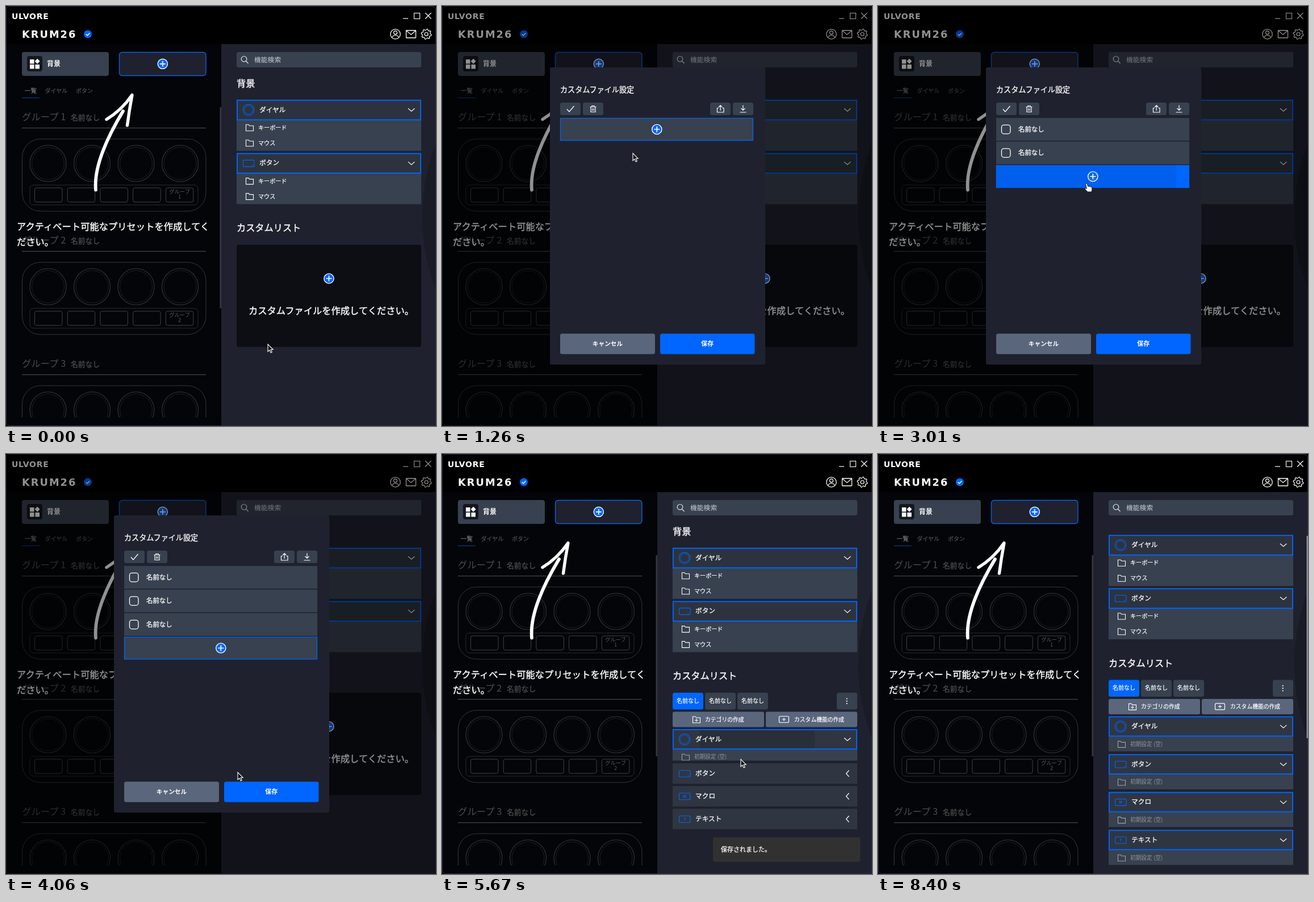
An HTML page for the animation above (8.54 s loop, 757 by 739 pixels).

```html
<!DOCTYPE html>
<html lang="ja">
<head>
<meta charset="utf-8">
<style>
html, body { margin: 0; width: 100%; height: 100%; overflow: hidden; background: #000; }
svg { display: block; }
text { font-family: "Noto Sans CJK JP", "Noto Sans CJK", "Noto Sans", sans-serif; white-space: pre; }
.brand { font-family: "DejaVu Sans", sans-serif; font-weight: 700; }
</style>
</head>
<body>
<svg id="stage" width="757" height="739" viewBox="0 0 757 739"></svg>
<script>
const LOOP = 8540, STEP = 70;
const BLUE = '#0066ff', PANEL = '#1f222e', SLATE = '#38414f', ROW = '#2f3642', STEEL = '#5a667c';

// --- markup helpers ---
const rect = (x, y, w, h, r, fill, stroke = 'none', sw = 1, extra = '') =>
  `<rect x="${x}" y="${y}" width="${w}" height="${h}" rx="${r}" fill="${fill}" stroke="${stroke}" stroke-width="${sw}" ${extra}/>`;
const circle = (x, y, r, fill, stroke = 'none', sw = 1, extra = '') =>
  `<circle cx="${x}" cy="${y}" r="${r}" fill="${fill}" stroke="${stroke}" stroke-width="${sw}" ${extra}/>`;
const line = (d, stroke = '#fff', sw = 1.2, extra = '') =>
  `<path d="${d}" fill="none" stroke="${stroke}" stroke-width="${sw}" ${extra}/>`;
// A hairline outline turns the regular face into a medium one.
const label = (x, cy, s, size, fill = '#fff', weight = 500, anchor = 'start') =>
  `<text x="${x}" y="${cy + size * 0.36}" font-size="${size}" fill="${fill}" font-weight="${weight}" text-anchor="${anchor}"` +
  (weight === 500 ? ` stroke="${fill}" stroke-width="${size * 0.024}"` : '') + `>${s}</text>`;
const group = (id, body, extra = '') => `<g id="${id}" ${extra}>${body}</g>`;
const crop = (x, y, w, h, body) =>
  `<svg x="${x}" y="${y}" width="${w}" height="${h}" viewBox="${x} ${y} ${w} ${h}">${body}</svg>`;
const times = (n, f) => Array.from({ length: n }, (_, i) => f(i)).join('');

// --- icons ---
const plus = (x, y) => circle(x, y, 8.6, BLUE, '#fff', 1.4) + line(`M${x - 5} ${y}h10M${x} ${y - 5}v10`, '#fff', 1.7);
const folder = (x, y, c = '#fff') => line(`M${x} ${y - 5.5}h4.5l1.8 2h6.7v9h-13z`, c, 1.1);
const chevDown = y => line(`M708 ${y - 2.5}l5.7 5 5.7 -5`);
const chevLeft = y => line(`M716.5 ${y - 5.5}l-5 5.5 5 5.5`);
const dialIcon = y => circle(427, y, 9.7, 'none', BLUE, 1.1) + circle(427, y, 7.4, 'none', BLUE, 0.7);
const keyIcon = (y, s = '') => rect(417.5, y - 5.5, 19.5, 11.5, 2, 'none', BLUE, 1.1) +
  (s ? label(427.2, y + .3, s, 6.5, BLUE, 700, 'middle') : line(`M432.5 ${y + 3.5}h2`, BLUE, 1));

function gear(x, y) {
  const at = i => {
    const a = (i + .5) * Math.PI / 16, r = i % 4 < 2 ? 9 : 7;
    return `${(x + r * Math.cos(a)).toFixed(1)} ${(y + r * Math.sin(a)).toFixed(1)}`;
  };
  return line(`M${Array.from({ length: 32 }, (_, i) => at(i)).join('L')}Z`, '#fff', 1.2, 'stroke-linejoin="round"') +
    circle(x, y, 3, 'none', '#fff', 1.2);
}

function header() {
  return rect(0, 0, 757, 67, 0, '#000') +
    '<text class="brand" x="10" y="22.5" font-size="14" letter-spacing=".7" fill="#fff">ULVORE</text>' +
    '<text class="brand" x="28" y="56" font-size="17.8" letter-spacing="2" fill="#fff">KRUM26</text>' +
    circle(144, 49.5, 7, BLUE) + line('M140.8 49.6l2.4 2.4 4.2-4.6', '#fff', 1.5) +
    line('M699 22h9') + rect(718.5, 12.5, 10, 10, 0, 'none', '#fff', 1.1) + line('M738 12l10.500 10.500M748.500 12l-10.500 10.500') +
    circle(685.5, 49.5, 8.7, 'none', '#fff', 1.3) + circle(685.5, 46.8, 3, 'none', '#fff', 1.2) + line('M679.500 55.500q1.500-4 6-4t6 4') +
    rect(704.5, 43, 17, 13, .5, 'none', '#fff', 1.3) + line('M705 43.500l8 7 8-7') +
    gear(740, 49.5);
}

function device(i) {
  const y = 217 * i, dim = '#373738';
  return label(28, 195.5 + y, `グループ ${i + 1}`, 16.4, '#4c4c4e', 400) +
    label(114, 196 + y, '名前なし', 12.8, '#4c4c4e') +
    line(`M28 ${214.7 + y}h324`, '#444446') +
    rect(28.5, 234 + y, 323.5, 127, 32, 'none', dim) +
    times(4, k => circle(74 + 77.5 * k, 277 + y, 32, 'none', dim, 1.1) + circle(74 + 77.5 * k, 277 + y, 28.5, 'none', '#232325', .9)) +
    rect(42, 315 + y, 296, 35, 6, 'none', '#2a2a2c') +
    times(5, k => rect(50.5 + 57.7 * k, 320 + y, 48.5, 25, 3.5, 'none', '#424244')) +
    label(305.5, 327 + y, 'グループ', 9.3, '#59595b', 400, 'middle') +
    label(305.5, 336 + y, i + 1, 9.3, '#59595b', 400, 'middle');
}

function leftPane() {
  const icon = rect(37, 88, 27, 27, 4, '#14171d') + rect(42, 94, 7.5, 7.5, .5, '#fff') + rect(42, 103, 7.5, 7.5, .5, '#fff') +
    rect(51.5, 103, 7.5, 7.5, .5, '#fff') + rect(52, 94, 6.5, 6.5, .5, '#fff', 'none', 0, 'transform="rotate(45 55.2 97.2)"');
  return rect(0, 67, 379, 672, 0, '#040508') +
    rect(28, 81, 153, 42, 4, SLATE) + icon + label(72, 102, '背景', 12, '#fff', 700) +
    rect(199.5, 81.5, 152.5, 41, 5, PANEL, '#0c5fe6', 1.4) + plus(275.8, 101.8) +
    label(33, 149.7, '一覧', 10.5, '#666') + label(68.5, 149.7, 'ダイヤル', 10, '#4f4f51') + label(123, 149.7, 'ボタン', 10, '#4f4f51') +
    line('M28 161.500h31', '#0a2c68', 1.6) +
    crop(0, 170, 379, 554, times(3, device)) +
    rect(376.5, 178, 2.5, 354, 1, '#38393d') +
    line('M158 323.500C155 290 171 243 206 185', '#fff', 5.8, 'stroke-linecap="round"') +
    line('M177 199.500Q204 183 222 156.500Q217 183 213.500 210', '#fff', 5.4, 'stroke-linecap="round" stroke-linejoin="round"') +
    label(19, 388, 'アクティベート可能なプリセットを作成してく', 16.3) +
    label(19, 415.3, 'ださい。', 16.3);
}

const section = (y, icon, name) =>
  rect(406, y + 34, 325, 55, 0, SLATE) + rect(407, y, 323, 34.5, 0, '#2c333f', BLUE, 1.9) + icon(y + 17) +
  label(446, y + 16.5, name, 11.7) + chevDown(y + 17) +
  folder(422.5, y + 48.5) + label(444, y + 48.5, 'キーボード', 10.1) +
  folder(422.5, y + 75.5) + label(444, y + 75.5, 'マウス', 10.1);

const rows = [['ダイヤル', dialIcon], ['ボタン', y => keyIcon(y)], ['マクロ', y => keyIcon(y, 'M')], ['テキスト', y => keyIcon(y, 'T')]];

const listRow = ([name, icon], i) => group('row' + i,
  `<svg id="body${i}" x="406" y="35" width="325" height="0">` + rect(0, 0, 325, 27, 0, SLATE) +
  folder(16.5, 14.5, '#9da3ad') + label(38, 14, '初期設定 (空)', 9.7, '#9096a1', 400) + '</svg>' +
  rect(406, 0, 325, 36, 1, ROW) +
  `<svg x="406" y="0" width="325" height="36">${circle(0, 0, 0, '#000', 'none', 0, `id="rip${i}"`)}</svg>` +
  rect(407, 1, 323, 34, 0, 'none', BLUE, 1.9, `id="edge${i}"`) +
  icon(18) + label(446, 17.5, name, 11.7) + group('down' + i, chevDown(18)) + group('left' + i, chevLeft(18)));

function rightPane() {
  const empty = rect(406, 420, 325, 180, 4, '#0d0e14') + plus(568.5, 479.5) +
    label(427, 536, 'カスタムファイルを作成してください。', 16.3);
  const list = times(3, i => rect(406 + 57 * i, 420, 54, 29.5, 3.5, i ? SLATE : BLUE) + label(433 + 57 * i, 434.5, '名前なし', 10, '#fff', 500, 'middle')) +
    rect(695, 420, 36, 29.5, 3.5, SLATE) + times(3, i => circle(712.7, 430.5 + 4.3 * i, 1.1, '#fff')) +
    rect(406, 453.5, 161, 27, 3, STEEL) + folder(441.5, 467.5) + line('M445 468.500h6M448 465.500v6', '#fff', 1) + label(463, 467, 'カテゴリの作成', 9.8) +
    rect(570, 453.5, 161, 27, 3, STEEL) + rect(593.5, 461.5, 17, 11, 2, 'none', '#fff', 1.2) + line('M599 467h6M602 464v6', '#fff', 1.1) + label(620, 467, 'カスタム機能の作成', 9.8) +
    rows.map(listRow).join('');
  return rect(379, 67, 378, 672, 0, PANEL) + circle(1097, 370, 364, '#191b25') +
    rect(406, 81, 325, 27, 3.5, SLATE) + circle(419, 93.3, 4.8, 'none', '#e6e8ec', 1.2) + line('M422.500 97l4 4', '#e6e8ec') +
    label(437, 94.5, '機能検索', 11.8, '#c8ccd4', 400) +
    crop(380, 123, 377, 601, group('scroll',
      label(406, 136, '背景', 16.2) + section(165.8, dialIcon, 'ダイヤル') + section(259.6, y => keyIcon(y), 'ボタン') +
      label(406, 390.5, 'カスタムリスト', 16.2) + group('empty', empty) + group('list', list))) +
    rect(755, 144, 2, 356, 0, '#fff', 'none', 0, 'id="bar"');
}

function dialog() {
  const tool = x => rect(x, 170, 36, 22, 3.5, SLATE);
  const item = i => group('item' + i, rect(208, 197 + 41.5 * i, 340, 40, 0, SLATE) +
    rect(217.5, 209.3 + 41.5 * i, 15.5, 15.5, 4, 'none', '#fff', 1.3) + label(247, 216.5 + 41.5 * i, '名前なし', 11.4));
  return rect(190, 108, 379, 523, 3, PANEL) + label(208, 147.5, 'カスタムファイル設定', 13.1) +
    [208, 248, 472, 512].map(tool).join('') +
    line('M220 181.500l4 4.500 8.500-10', '#fff', 1.3) +
    line('M260.500 177.500h11M264 177.500v-2h4v2M262 178v8.500h8v-8.500M264.700 180v4.500M267.300 180v4.500') +
    line('M487 179.500h-2.500v7.500h11.500v-7.500h-2.500M490.200 184v-9M487 178l3.200-3.200 3.200 3.200') +
    line('M530 174.500v9M526.500 180l3.500 3.500 3.500-3.500M524.500 187h11') +
    times(3, item) +
    group('add', rect(208.5, .5, 339, 39, 0, SLATE, BLUE, 1.2, 'id="addBox"') +
      `<svg x="208" y="0" width="340" height="40">${circle(0, 0, 0, '#000', 'none', 0, 'id="ripAdd"')}</svg>` + plus(378.3, 20)) +
    rect(208, 576.5, 167, 36, 3.5, STEEL) + label(291.5, 594.5, 'キャンセル', 10.7, '#fff', 700, 'middle') +
    rect(384, 576.5, 166.5, 36, 3.5, BLUE) +
    `<svg x="384" y="576.5" width="166.5" height="36">${circle(0, 0, 0, '#fff', 'none', 0, 'id="ripSave"')}</svg>` +
    label(467.3, 594.5, '保存', 11, '#fff', 700, 'middle');
}

const toast = rect(-129.5, -21.5, 259, 43, 3.5, '#313131') + label(-115.5, 0, '保存されました。', 11);
const arrow = '<path id="arrow" d="M0 0V13L3 10.300 5.200 15 7.300 14 5.200 9.500H9.200Z" fill="#111" stroke="#fff" stroke-width="1.1"/>';
const hand = '<path id="hand" d="M-1.500 1Q0-1 1.300 1L2.500 5.500Q4 4.500 5 5.800Q6.500 5 7.300 6.300Q9 5.800 9.500 7.500L10 11 8.800 15H2.200L-2.800 10Q-3.200 8 -1 8.800L.3 9.500Z" fill="#fff" stroke="#111" stroke-width=".9"/>';

const stage = document.getElementById('stage');
stage.innerHTML = leftPane() + rightPane() + header() +
  rect(.5, .5, 756, 738, 7, 'none', '#2b2842', 1) +
  group('modal', rect(0, 0, 757, 739, 0, '#000', 'none', 0, 'opacity=".43"') + dialog()) +
  group('toast', toast) + group('cursor', arrow + hand);

const el = {};
stage.querySelectorAll('[id]').forEach(n => el[n.id] = n);
const set = (id, attrs) => { for (const k in attrs) el[id].setAttribute(k, attrs[k]); };
const show = (id, on) => set(id, { visibility: on ? 'inherit' : 'hidden' });

// --- timing ---
const span = (t, a, b) => Math.min(1, Math.max(0, (t - a) / (b - a)));
const ease = p => p * p * (3 - 2 * p);
const fade = (t, a, b) => ease(span(t, a, b));

const added = [1750, 2310, 3080];
const opened = [5520, 6060, 6560, 7310];

// time, x, y, pointing hand
const track = [
  [0, 461, 595, 0], [350, 548, 490, 1], [560, 548, 490, 0], [1190, 330, 276, 0], [1260, 336, 259, 0],
  [1470, 366, 222, 1], [1750, 366, 222, 0], [1960, 368, 262, 1], [2310, 368, 262, 0], [2520, 367, 312, 1],
  [3080, 367, 312, 0], [3430, 374, 345, 0], [4060, 408, 560, 0], [4270, 417, 585, 1], [4830, 417, 585, 1],
  [4970, 419, 584, 0], [5180, 552, 509, 0], [5320, 554, 509, 1], [5530, 554, 509, 0], [5670, 526, 537, 0],
  [5880, 500, 563, 1], [6160, 500, 566, 0], [6420, 468, 630, 1], [6640, 466, 632, 0], [6930, 445, 688, 1],
  [7420, 445, 688, 0], [7840, 520, 640, 0], [8120, 600, 680, 0], [8260, 640, 750, 0], [LOOP, 640, 750, 0]
];

function pointer(t) {
  const i = track.findIndex((k, n) => n + 1 === track.length || track[n + 1][0] > t);
  const a = track[i], b = track[i + 1] || a, p = fade(t, a[0], b[0]);
  return { x: a[1] + (b[1] - a[1]) * p, y: a[2] + (b[2] - a[2]) * p, hand: a[3] };
}

function ripple(id, t, press, x, y, strength) {
  const p = span(t, press, press + 550);
  set(id, { cx: x, cy: y, r: t < press ? 0 : 190 * (1 - (1 - p) ** 1.6), opacity: strength * (1 - span(t, press + 400, press + 750)) });
}

function render(t) {
  const c = pointer(t);
  set('cursor', { transform: `translate(${c.x} ${c.y})` });
  show('hand', c.hand);
  show('arrow', !c.hand);

  const count = added.filter(a => t >= a).length, addY = 197 + 41.5 * count;
  const alpha = fade(t, 540, 770) * (1 - fade(t, 4770, 4970));
  set('modal', { opacity: alpha });
  show('modal', alpha > 0);
  added.forEach((a, i) => show('item' + i, t >= a));
  set('add', { transform: `translate(0 ${addY})` });
  set('addBox', { fill: c.hand && c.y > addY && c.y < addY + 40 ? BLUE : SLATE });
  const press = [1610, 2170, 2640].filter(a => t >= a).pop() ?? 1610;
  ripple('ripAdd', t, press, 159, 20, count === 3 ? 0 : .07);
  ripple('ripSave', t, 4640, 36, 18, .28);

  const saved = t >= 4740;
  show('empty', !saved);
  show('list', saved);
  let y = 484;
  opened.forEach((start, i) => {
    const e = fade(t, start, start + 220);
    set('row' + i, { transform: `translate(0 ${y})` });
    set('body' + i, { height: 27 * e });
    show('edge' + i, saved && e > 0);
    show('down' + i, saved && e > 0);
    show('left' + i, saved && e === 0);
    ripple('rip' + i, t, start - 60, [149, 94, 60, 40][i], 18, .13);
    y += 40 + 26.6 * e;
  });

  set('scroll', { transform: `translate(0 ${-22.6 * fade(t, 7900, 8120)})` });
  show('bar', t >= 7420);

  const grow = fade(t, 4735, 4945), out = fade(t, 7760, 7950), g = grow * (1 - out);
  set('toast', { opacity: g * g, transform: `translate(606.5 696) scale(${.75 + .25 * g} ${.5625 + .4375 * g})` });
}

function tick(now) {
  const t = now % LOOP;
  render(Math.min(Math.floor(t / STEP) * STEP, 8400));
  requestAnimationFrame(tick);
}
render(0);
requestAnimationFrame(tick);
</script>
</body>
</html>
```
